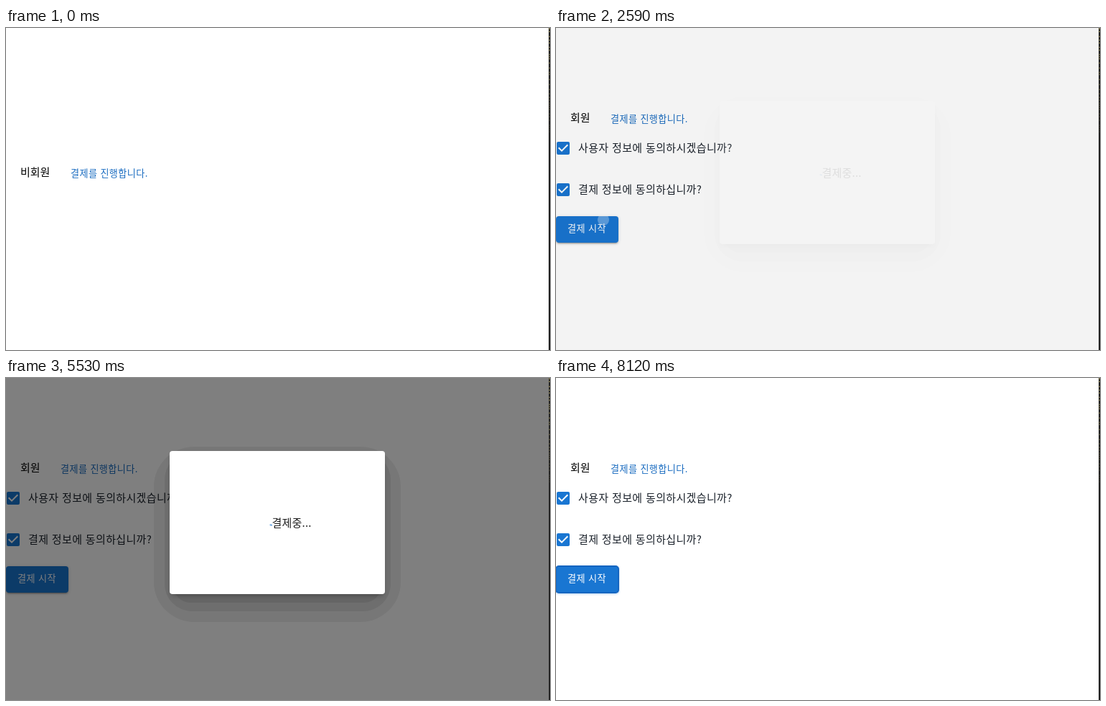
Animation of 758x450 px, one loop 8400 ms. Source, as an HTML page:

```html
<!DOCTYPE html>
<html lang="ko">
<head>
<meta charset="utf-8">
<style>
html, body { margin: 0; width: 100%; height: 100%; overflow: hidden; background: #fff; }
#stage {
  position: relative; width: 758px; height: 450px; overflow: hidden; background: #fff;
  font: 15px/20px "Noto Sans CJK KR", "Noto Sans CJK", sans-serif; color: #1c232c;
}
#stage * { position: absolute; box-sizing: border-box; }
.text { white-space: nowrap; margin-top: -11px; }
.name { left: 20px; color: #000; font-weight: 500; }
.label { left: 31px; letter-spacing: .35px; }
.link, .btn { font-size: 13.1px; letter-spacing: .4px; font-weight: 500; }
.link { color: #1a6cc0; margin-top: -10.5px; }
.box { left: 1px; width: 18px; height: 18px; margin-top: -9px; border: 2px solid #666; border-radius: 2px; }
.box svg { display: none; left: -2px; top: -2px; }
.box.on { border-color: #1976d2; background: #1976d2; }
.box.on svg { display: block; }
.clip { overflow: hidden; border-radius: 4px; }
.ripple { border-radius: 50%; }
#linkArea { left: 68px; top: 162.75px; width: 124px; height: 36.5px; }
#shade { inset: 0; background: #000; }
#pay {
  left: 0; top: 263px; width: 86.5px; height: 36.5px; border-radius: 4px; background: #1976d2;
  box-shadow: 0 3px 1px -2px #0003, 0 2px 2px #0002, 0 1px 5px #0002;
}
#pay.focus { box-shadow: inset 0 0 0 1px #1565c0, 0 0 0 1px #1565c0, 0 1px 3px 1px #1976d255; }
#pay .clip { inset: 0; }
.btn { left: 16px; top: 18px; color: #fff; }
#dialog { left: 228px; top: 102px; width: 300px; height: 200px; }
.ring { background: rgba(0, 0, 0, .08); }
.wide { background: rgba(0, 0, 0, .065); }
.closing .wide { box-shadow: 0 0 0 6px rgba(0, 0, 0, .065); }
#paper { inset: 0; border-radius: 4px; background: #fff; box-shadow: 0 4px 6px -2px rgba(0, 0, 0, .25); }
#spin { top: 80.5px; width: 40px; height: 40px; }
#msg { top: 100.5px; letter-spacing: .2px; }
#edge { left: 756px; top: 0; width: 2px; height: 450px; background: linear-gradient(90deg, #777, #0b0b0b 60%); }
#edge i { left: 0; width: 2px; height: 2px; background: #6b6548; }
</style>
</head>
<body>
<div id="stage">
  <div id="linkArea" class="clip"><div class="ripple" id="linkRipple"></div></div>
  <div class="text name" id="name"></div>
  <div class="text link" id="link">결제를 진행합니다.</div>
  <div class="box" id="box1"></div>
  <div class="text label" id="label1">사용자 정보에 동의하시겠습니까?</div>
  <div class="box" id="box2"></div>
  <div class="text label" id="label2">결제 정보에 동의하십니까?</div>
  <div id="pay">
    <div class="clip"><div class="ripple" id="payRipple"></div></div>
    <div class="text btn">결제 시작</div>
  </div>
  <div id="shade"></div>
  <div id="dialog">
    <div class="ring wide" style="inset:-6px -22px -39px;border-radius:56px"></div>
    <div class="ring" style="inset:2px -7.5px -24px;border-radius:38px"></div>
    <div class="ring" style="inset:12px 5px -12px;border-radius:24px"></div>
    <div id="paper">
      <svg id="spin" viewBox="22 22 44 44"><circle cx="44" cy="44" r="20.2" fill="none" stroke="#1976d2" stroke-width="3.6"/></svg>
      <div class="text" id="msg"></div>
    </div>
  </div>
  <div id="edge"></div>
</div>
<script>
const $ = id => document.getElementById(id);
const LOOP = 8400, SLOW = 1.05;
const T = { join: 630, agree1: 1540, agree2: 2170, open: 2550, wait: 5705, close: 7818 };
const SPIN = { start: 2569, period: 1469 };

const clamp = v => Math.min(1, Math.max(0, v));
function bezier(x1, x2) {
  const at = (a, b, s) => 3 * a * s * (1 - s) ** 2 + 3 * b * s * s * (1 - s) + s ** 3;
  return x => {
    let lo = 0, hi = 1;
    for (let i = 0; i < 24; i++) {
      const mid = (lo + hi) / 2;
      if (at(x1, x2, mid) < x) lo = mid; else hi = mid;
    }
    return at(0, 1, lo);
  };
}
const ease = bezier(.4, .2), inOut = bezier(.42, .58);
const ramp = (t, start, ms) => ease(clamp((t - start) / (ms * SLOW)));

function ripple(el, t, start, hold) {
  el.style.transform = `scale(${ramp(t, start, 550)})`;
  el.style.opacity = t < start ? 0 : .3 * (1 - ramp(t, start + hold, 550));
}
function setupRipple(el, x, y, r, color) {
  Object.assign(el.style, { left: x - r + 'px', top: y - r + 'px', width: 2 * r + 'px', height: 2 * r + 'px', background: color });
}
const show = (el, on) => { el.style.display = on ? '' : 'none'; };
const setTop = (el, y) => { el.style.top = y + 'px'; };

function spinner(t) {
  const p = ((t - SPIN.start) / SPIN.period % 1 + 1) % 1;
  const q = inOut(p < .5 ? p * 2 : p * 2 - 1);
  const dash = p < .5 ? 1 + 99 * q : 100;
  const offset = p < .5 ? 15 * q : 15 + 110 * q;
  const c = $('spin').firstElementChild;
  c.setAttribute('stroke-dasharray', `${dash} 200`);
  c.setAttribute('stroke-dashoffset', -offset);
  c.setAttribute('transform', `rotate(${360 * p} 44 44)`);
}

function render(t) {
  const step = [T.join, T.agree1, T.agree2].filter(s => t >= s).length;
  const y = [202, 181, 152, 126][step];
  const waiting = t >= T.wait && t < T.close;
  const fade = t < T.close ? ramp(t, T.open, 225) : 1 - ramp(t, T.close, 195);

  $('name').textContent = step ? '회원' : '비회원';
  setTop($('name'), y);
  setTop($('link'), y + 1);
  $('link').style.left = step ? '76px' : '90px';
  [1, 2].forEach(n => {
    const at = y + 42 + (n - 1) * 58;
    for (const el of [$('box' + n), $('label' + n)]) {
      show(el, step >= n);
      setTop(el, at);
    }
    $('box' + n).classList.toggle('on', step > n);
  });
  show($('pay'), step === 3);
  $('pay').classList.toggle('focus', t >= T.close);
  show($('linkArea'), step === 1);
  ripple($('linkRipple'), t, 540, 90);
  ripple($('payRipple'), t, 2485, 100);

  $('shade').style.opacity = .5 * fade;
  show($('dialog'), fade > 0);
  $('dialog').style.opacity = fade;
  $('dialog').classList.toggle('closing', t >= T.close);
  $('spin').style.left = (waiting ? 56.5 : 102.5) + 'px';
  $('msg').style.left = (waiting ? 96.5 : 142.5) + 'px';
  $('msg').style.color = waiting ? '#b71c1c' : '#1c1c1c';
  $('msg').textContent = waiting ? '잠시만 기다려 주세요...' : '결제중...';
  spinner(t);
}

for (const id of ['box1', 'box2'])
  $(id).innerHTML = '<svg width="18" height="18" viewBox="-9 -9 18 18"><path d="M-6.3-.7-2 3.6 6.3-4.7" fill="none" stroke="#fff" stroke-width="2"/></svg>';
setupRipple($('linkRipple'), 58, 18, 70, '#1976d2');
setupRipple($('payRipple'), 66, 5, 75, '#fff');

let seed = 7;
for (let y = 0; y < 150; y += 3 + seed % 5) {
  seed = seed * 73 % 1009;
  const speck = document.createElement('i');
  speck.style.top = y + 'px';
  speck.style.opacity = 1 - y / 170;
  $('edge').append(speck);
}

const begin = performance.now();
(function tick() {
  render((performance.now() - begin) % LOOP);
  requestAnimationFrame(tick);
})();
</script>
</body>
</html>
```
